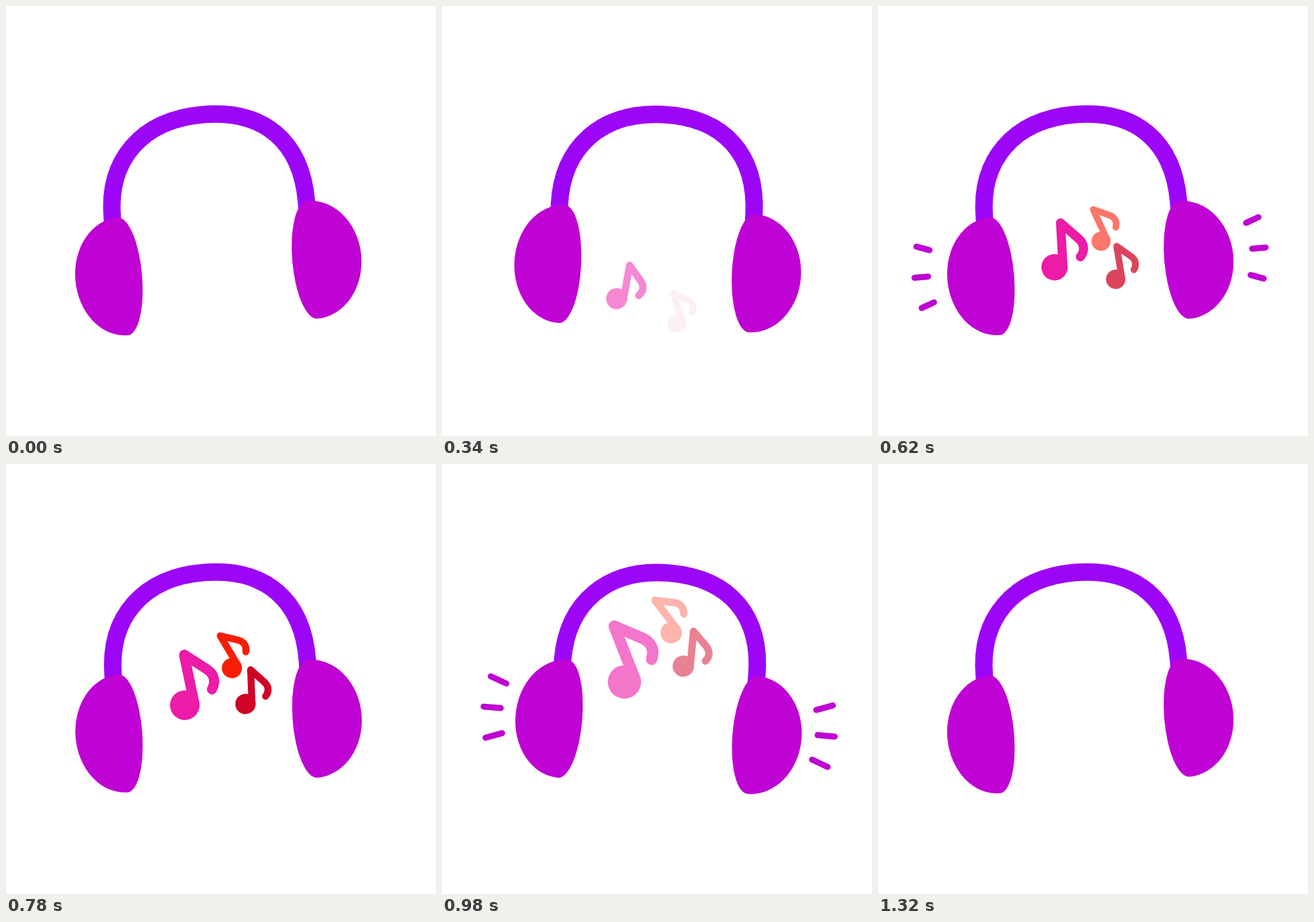
An HTML page with a canvas for the animation above (1.34 s loop, 640 by 640 pixels).

```html
<!DOCTYPE html>
<html lang="en">
<head>
<meta charset="utf-8">
<title>Headphones</title>
<style>
  html, body { margin: 0; width: 100%; height: 100%; overflow: hidden; background: #fff; }
  canvas { display: block; width: 640px; height: 640px; }
</style>
</head>
<body>
<canvas id="stage" width="640" height="640"></canvas>
<script>
const ctx = document.getElementById('stage').getContext('2d');

const LOOP = 1340, STEP = 20;
const SWING = 4000 / 6, RISE = 317, TILT = 5;
const PULSE = 4000 / 9;
const PIVOT = { x: 311, y: 427 };
const BAND = '#9d05f7', CUP = '#bf03d4';

// Each note glides from one pose to another while it fades in and out
const NOTES = [
  { rgb: [236, 27, 168], glide: [0, 1333], fadeIn: [95, 565], fadeOut: [802, 1246],
    from: { x: 271, y: 442, angle: 29, height: 45.7 },
    to: { x: 262.5, y: 249.5, angle: -18.5, height: 92.6 } },
  { rgb: [208, 4, 38], glide: [200, 1240], fadeIn: [315, 725], fadeOut: [785, 1175],
    from: { x: 345.5, y: 461, angle: -9, height: 45.5 },
    to: { x: 370.7, y: 240.5, angle: 21, height: 55.7 } },
  { rgb: [247, 30, 7], glide: [200, 1240], fadeIn: [385, 775], fadeOut: [785, 1077],
    from: { x: 324, y: 399.7, angle: -4.6, height: 44.7 },
    to: { x: 330, y: 195, angle: -30.6, height: 55.7 } }
];
const NOTE_HEIGHT = 3.41;

const ramp = (t, from, to) => Math.min(1, Math.max(0, (t - from) / (to - from)));
const smooth = s => s * s * (3 - 2 * s);
const mix = (a, b, k) => a + (b - a) * k;
const radians = deg => deg * Math.PI / 180;

// Cubic-bezier(.94, 0, .94, 1)
function lateEase(u) {
  let lo = 0, hi = 1;
  for (let i = 0; i < 24; i++) {
    const s = (lo + hi) / 2;
    const x = 3 * s * (1 - s) * 0.94 + s ** 3;
    if (x < u) lo = s; else hi = s;
  }
  return smooth(lo);
}

function tiltAt(t) {
  const phase = t % SWING;
  const u = phase < RISE ? phase / RISE : (SWING - phase) / (SWING - RISE);
  return TILT * (2 * lateEase(u) - 1);
}

function drawCup(x, y, leftRadius, rightRadius) {
  ctx.beginPath();
  ctx.ellipse(x, y, rightRadius, 88, 0, -Math.PI / 2, Math.PI / 2);
  ctx.ellipse(x, y, leftRadius, 88, 0, Math.PI / 2, Math.PI * 1.5);
  ctx.fill();
}

function drawBand() {
  ctx.strokeStyle = BAND;
  ctx.lineWidth = 26;
  ctx.lineCap = 'butt';
  ctx.beginPath();
  ctx.moveTo(168.5, 330);
  ctx.lineTo(168.5, 303);
  ctx.bezierCurveTo(168.5, 217, 223.5, 161, 316, 161);
  ctx.bezierCurveTo(408.5, 161, 458.5, 215, 458.5, 303);
  ctx.lineTo(458.5, 330);
  ctx.stroke();
}

// Three sound lines fan out beside each cup
function drawRays(t) {
  const phase = t % PULSE;
  const start = ramp(phase, 160, 235), end = ramp(phase, 40, 90);
  if (start >= end) return;
  ctx.strokeStyle = CUP;
  ctx.lineWidth = 9;
  ctx.lineCap = 'round';
  ctx.beginPath();
  for (const side of [-1, 1]) {
    for (const row of [-1, 0, 1]) {
      const angle = radians(20 * row);
      const point = k => {
        const along = mix(-12.8, 12.8, k);
        return [319.5 + side * (249.5 - 6 * Math.abs(row) + along * Math.cos(angle)),
          382.5 + 41.5 * row + along * Math.sin(angle)];
      };
      ctx.moveTo(...point(start));
      ctx.lineTo(...point(end));
    }
  }
  ctx.stroke();
}

function drawHeadphones(t) {
  ctx.save();
  ctx.translate(PIVOT.x, PIVOT.y);
  ctx.rotate(radians(tiltAt(t)));
  ctx.translate(-PIVOT.x, -PIVOT.y);
  drawBand();
  ctx.fillStyle = CUP;
  drawCup(176.5, 390.5, 70.8, 28.7);
  drawCup(459.5, 390.5, 29.7, 73.3);
  drawRays(t);
  ctx.restore();
}

function drawNote({ rgb, glide, fadeIn, fadeOut, from, to }, t) {
  const alpha = ramp(t, ...fadeIn) * (1 - ramp(t, ...fadeOut));
  if (alpha <= 0) return;
  const k = smooth(ramp(t, ...glide));
  const size = mix(from.height, to.height, k) / NOTE_HEIGHT;
  // Tinted towards white so that overlapping parts stay even
  const color = `rgb(${rgb.map(c => Math.round(mix(255, c, alpha))).join()})`;
  ctx.save();
  ctx.translate(mix(from.x, to.x, k), mix(from.y, to.y, k));
  ctx.rotate(radians(mix(from.angle, to.angle, k)));
  ctx.scale(size, size);
  ctx.translate(0, NOTE_HEIGHT / 2);
  ctx.fillStyle = ctx.strokeStyle = color;
  ctx.lineWidth = 0.69;
  ctx.lineCap = ctx.lineJoin = 'round';
  ctx.beginPath();
  ctx.arc(0, 0, 1, 0, Math.PI * 2);
  ctx.fill();
  ctx.beginPath();
  ctx.moveTo(0.65, -0.05);
  ctx.lineTo(0, -NOTE_HEIGHT);
  ctx.lineTo(1.5, -2.42);
  ctx.bezierCurveTo(2, -2.1, 2.15, -1.6, 1.85, -1.05);
  ctx.stroke();
  ctx.restore();
}

function draw(t) {
  ctx.fillStyle = '#fff';
  ctx.fillRect(0, 0, 640, 640);
  drawHeadphones(t);
  for (const note of NOTES) drawNote(note, t);
}

let began;
function tick(now) {
  began ??= now;
  const t = (now - began) % LOOP;
  draw(Math.floor(t / STEP) * STEP);
  requestAnimationFrame(tick);
}
draw(0);
requestAnimationFrame(tick);
</script>
</body>
</html>
```
